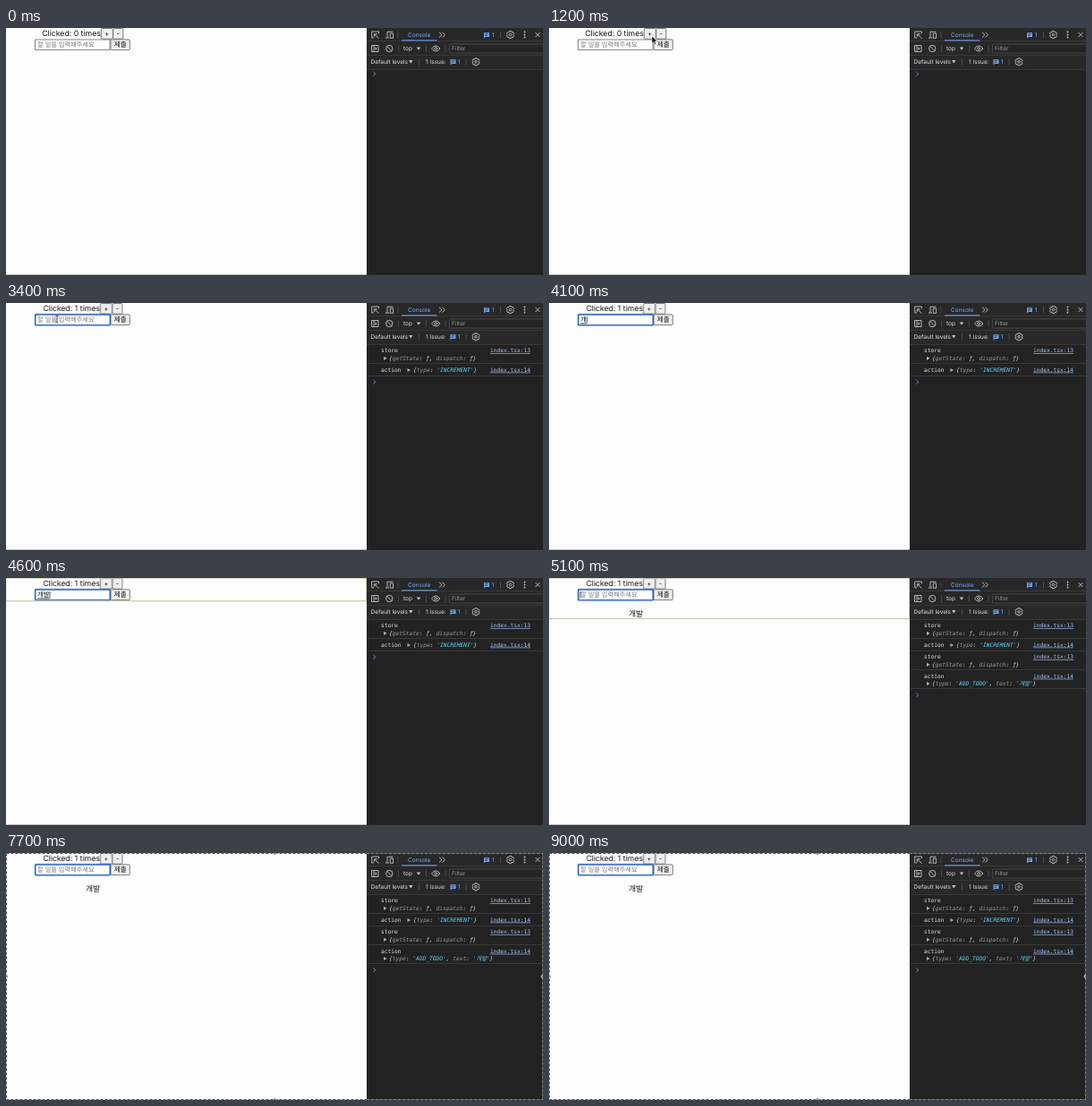
These frames come from a looping animation (600 by 276 pixels, 9.1 s). An HTML page:

```html
<!DOCTYPE html>
<html lang="ko">
<head>
<meta charset="utf-8">
<title>Counter and todo</title>
<style>
html, body { margin: 0; width: 100%; height: 100%; overflow: hidden; background: #fdfdfd; }
svg { display: block; width: 600px; height: 276px; text-rendering: geometricPrecision; }
text { white-space: pre; }
.page { font-family: Inter, "Noto Sans CJK KR", "Noto Sans CJK", sans-serif; fill: #111; }
.ko { font-family: "Noto Sans CJK KR", "Noto Sans CJK", sans-serif; }
.tools { font: 6.5px Inter, Roboto, sans-serif; fill: #dcdcdc; }
.log { font: 6.23px "DejaVu Sans Mono", "Noto Sans CJK KR", monospace; fill: #e3e3e3; }
.obj { font-style: italic; fill: #d0d0d0; }
.key { fill: #9a9a9a; }
.str { fill: #5cd5fb; }
.link { fill: #a8c7fa; text-decoration: underline; }
.line { fill: none; stroke: #c4c4c4; stroke-width: .9; }
.rule { stroke: #383838; stroke-width: 1; }
.prompt { fill: none; stroke: #5f94e4; stroke-width: 1; }
.button { fill: #efefef; stroke: #6e6e6e; stroke-width: .9; }
.flash { fill: none; stroke: #c3c6ae; stroke-width: 1.1; }

/* Shared 9.1 s clock: hard switches unless marked linear */
.t { animation: 9.1s step-end infinite; }
.zero { animation-name: zero; }
.one { animation-name: one; }
.mid { animation-name: mid; }
.todo { animation-name: todo; }
.hint { animation-name: hint; }
.focus { animation-name: focus; }
.caret { animation-name: caret; }
.k1 { animation-name: k1; }
.k2 { animation-name: k2; }
.k3 { animation-name: k3; }
.k4 { animation-name: k4; }
.k5 { animation-name: k5; }
.flash-a { animation-name: flashA; }
.flash-b { animation-name: flashB; }
.arrow { animation-name: arrow; }
.beam { animation-name: beam; }
.recenter { animation-name: recenter; }
.frame { animation-name: frame; animation-timing-function: linear; }
.pointer { animation: move 9.1s linear infinite; }

@keyframes zero { 0% { opacity: 1 } 15.3%, 100% { opacity: 0 } }
@keyframes one { 0% { opacity: 0 } 15.3%, 100% { opacity: 1 } }
@keyframes mid { 0% { opacity: 0 } 15.3% { opacity: 1 } 56%, 100% { opacity: 0 } }
@keyframes todo { 0% { opacity: 0 } 56%, 100% { opacity: 1 } }
@keyframes hint { 0% { opacity: 1 } 38.4% { opacity: 0 } 56%, 100% { opacity: 1 } }
@keyframes focus { 0% { opacity: 0 } 30.7%, 100% { opacity: 1 } }
@keyframes caret {
  0%, 36.2%, 61.5%, 72.5%, 83.5%, 94.5%, 100% { opacity: 0 }
  30.7%, 56%, 67%, 78%, 89% { opacity: 1 }
}
@keyframes k1 { 0%, 40.6%, 100% { opacity: 0 } 38.4% { opacity: 1 } }
@keyframes k2 { 0%, 46.1%, 100% { opacity: 0 } 40.6% { opacity: 1 } }
@keyframes k3 { 0%, 48.3%, 100% { opacity: 0 } 46.1% { opacity: 1 } }
@keyframes k4 { 0%, 50.5%, 100% { opacity: 0 } 48.3% { opacity: 1 } }
@keyframes k5 { 0%, 56%, 100% { opacity: 0 } 50.5% { opacity: 1 } }
@keyframes flashA {
  0%, 20.8%, 42.8%, 53.8%, 100% { opacity: 0 }
  15.3%, 38.4%, 46.1% { opacity: 1 }
}
@keyframes flashB { 0%, 62.6%, 100% { opacity: 0 } 56% { opacity: 1 } }
@keyframes arrow { 0%, 29.6%, 100% { opacity: 0 } 1% { opacity: 1 } }
@keyframes beam { 0%, 38.4%, 100% { opacity: 0 } 29.6% { opacity: 1 } }
@keyframes recenter { 0% { transform: none } 15.3%, 100% { transform: translateX(-.8px) } }
@keyframes frame { 0%, 77.5% { opacity: 0 } 80.2%, 100% { opacity: 1 } }
@keyframes move {
  0%, 1% { transform: translate(18px, 162px); animation-timing-function: ease-in-out }
  11%, 16.5% { transform: translate(115px, 9px); animation-timing-function: ease-in-out }
  24%, 26.5% { transform: translate(61px, 25px); animation-timing-function: ease-in-out }
  30.7%, 100% { transform: translate(57px, 18px) }
}
</style>
</head>
<body>
<svg viewBox="0 0 600 276">
  <defs>
    <g id="gear" class="line">
      <path d="M-1-4.1H1L1.5-2.8L3-3L4-1.2L3.1 0L4 1.2L3 3L1.5 2.8L1 4.1H-1L-1.5 2.8L-3 3L-4 1.2L-3.1 0L-4-1.2L-3-3L-1.5-2.8Z"/>
      <circle r="1.3"/>
    </g>
    <g id="bubble">
      <path d="M-3-2.8H3V2H-1.4L-3 3.4Z" fill="#6ba4f8"/>
      <path d="M-1.8-1.3H1.8M-1.8.4H.8" stroke="#282828" stroke-width=".7"/>
    </g>
    <path id="bar" d="M0-3.5V3.5" stroke="#555" stroke-width=".8"/>
    <path id="down" d="M-2.2-1.6H2.2L0 1.8Z" fill="#c4c4c4"/>
    <path id="open" d="M0-2.1L3.6 0L0 2.1Z" fill="#b0b0b0"/>
    <path id="prompt" class="prompt" d="M410.3-2.3L412.8 0L410.3 2.3"/>
    <g id="store" class="log">
      <text x="419" y="55.3">store</text>
      <text class="link" x="541" y="55.3">index.tsx:13</text>
      <use href="#open" x="422" y="61.8"/>
      <text class="obj" x="428" y="63.9">{<tspan class="key">getState</tspan>: ƒ, <tspan class="key">dispatch</tspan>: ƒ}</text>
      <path class="rule" d="M404 67.5H600"/>
    </g>
  </defs>

  <!-- Page -->
  <rect width="403" height="276" fill="#fdfdfd"/>
  <path d="M0 275.5H403" stroke="#c9c9c9"/>
  <g class="page">
    <g class="t recenter">
      <g font-size="8.7" text-anchor="end">
        <text class="t zero" x="105.8" y="9">Clicked: 0 times</text>
        <text class="t one" x="105.8" y="9">Clicked: 1 times</text>
      </g>
      <rect class="button" x="106.3" y=".5" width="13" height="11.7" rx="1"/>
      <rect class="button" x="119.8" y=".5" width="11" height="11.7" rx="1"/>
      <g font-size="7.4" text-anchor="middle">
        <text x="112.8" y="8.6">+</text>
        <text x="125.3" y="8.6">-</text>
      </g>
    </g>
    <g transform="translate(0 -.3)">
      <rect x="32.5" y="13.3" width="83.5" height="11.4" fill="#fff" stroke="#777" stroke-width=".9"/>
      <rect class="button" x="117" y="13.2" width="21.3" height="11.7" rx="1"/>
      <text class="ko" x="127.7" y="21.8" font-size="7.6" font-weight="500" text-anchor="middle">제출</text>
      <rect class="t focus" x="32.7" y="13.2" width="83.6" height="11.7" rx="1" fill="#fff" stroke="#1f5fc0" stroke-width="1.5"/>
      <text class="t hint ko" x="35" y="21.3" font-size="7.2" fill="#757575">할 일을 입력해주세요</text>
      <path class="t caret" d="M35 15.3V22.8" stroke="#111" stroke-width=".8"/>
      <g class="ko" font-size="7.4" stroke-width=".7">
        <g class="t k1"><text x="35" y="21.5">ㄱ</text><path d="M35 23.1h6.8M42.3 15.5v7.5" stroke="#111"/></g>
        <g class="t k2"><text x="35" y="21.5">개</text><path d="M35 23.1h6.8M42.3 15.5v7.5" stroke="#111"/></g>
        <g class="t k3"><text x="35" y="21.5">갭</text><path d="M35 23.1h6.8M42.3 15.5v7.5" stroke="#111"/></g>
        <g class="t k4"><text x="35" y="21.5">개바</text><path d="M35 23.1h13.6M49 15.5v7.5" stroke="#111"/></g>
        <g class="t k5"><text x="35" y="21.5">개발</text><path d="M35 23.1h13.6M49 15.5v7.5" stroke="#111"/></g>
      </g>
    </g>
    <text class="t todo ko" x="97" y="43.2" font-size="8.8" text-anchor="middle">개발</text>
  </g>
  <rect class="t flash flash-a" x="-.2" y=".2" width="403" height="25.5"/>
  <rect class="t flash flash-b" x="-.2" y=".2" width="403" height="45.3"/>

  <!-- Developer tools -->
  <rect x="403" width="197" height="276" fill="#222"/>
  <rect x="403" width="197" height="46" fill="#282828"/>
  <path class="rule" d="M403 14.5H600M403 30.5H600M403 46.5H600"/>
  <g class="tools">
    <path class="line" d="M411 11H408.7V4H416.5V6.2M411.6 6.8L416.6 11.8M411.6 10V6.8H414.9"/>
    <path class="line" d="M426 10.5V4.2H432.5M424 11H428M429.3 6H432.6V11.3H429.3Z"/>
    <use href="#bar" x="438" y="7.5"/>
    <text x="449" y="10" fill="#7cacf8">Console</text>
    <path d="M442 13.9H481.5" stroke="#7cacf8" stroke-width="1"/>
    <path class="line" d="M484 4.7L487 7.6L484 10.5M487.5 4.7L490.5 7.6L487.5 10.5"/>
    <use href="#bubble" x="537" y="8"/>
    <text x="542.7" y="10.4" fill="#7cacf8">1</text>
    <use href="#bar" x="552.5" y="7.5"/>
    <use href="#gear" x="563.5" y="7.5"/>
    <g fill="#c4c4c4"><circle cx="579.5" cy="4.5" r=".9"/><circle cx="579.5" cy="7.5" r=".9"/><circle cx="579.5" cy="10.5" r=".9"/></g>
    <path class="line" d="M591.5 5L596.5 10M596.5 5L591.5 10"/>

    <path class="line" d="M408.5 19.5H416V26.5H408.5ZM411 19.5V26.5"/>
    <path d="M412.5 21.2L414.7 23L412.5 24.8Z" fill="#c4c4c4"/>
    <circle class="line" cx="428.3" cy="23" r="3.7"/>
    <path class="line" d="M425.7 20.4L430.9 25.6"/>
    <use href="#bar" x="438.5" y="23"/>
    <text x="444" y="25.3">top</text>
    <use href="#down" x="461" y="23"/>
    <use href="#bar" x="469.5" y="23"/>
    <path class="line" d="M475.5 23Q480.2 16.8 485 23Q480.2 29.2 475.5 23Z"/>
    <circle class="line" cx="480.2" cy="23" r="1.4"/>
    <use href="#bar" x="491" y="23"/>
    <rect x="495.5" y="18" width="106" height="10" rx="1" fill="#242424" stroke="#505050" stroke-width=".8"/>
    <text x="498" y="25.4" fill="#999">Filter</text>

    <text x="407.5" y="40">Default levels</text>
    <use href="#down" x="452.3" y="37.7"/>
    <use href="#bar" x="461.5" y="38"/>
    <text x="469" y="40">1 Issue:</text>
    <use href="#bubble" x="499.5" y="38"/>
    <text x="504.8" y="40.2" fill="#7cacf8">1</text>
    <use href="#bar" x="514" y="38"/>
    <use href="#gear" x="525" y="37.8"/>
  </g>

  <use class="t zero" href="#prompt" y="51.3"/>
  <g class="t one">
    <use href="#store"/>
    <g class="log">
      <text x="419" y="77">action</text>
      <text class="link" x="541" y="76.6">index.tsx:14</text>
      <use href="#open" x="448.5" y="75"/>
      <text class="obj" x="455" y="77">{<tspan class="key">type</tspan>: <tspan class="str">'INCREMENT'</tspan>}</text>
    </g>
    <path class="rule" d="M404 81.5H600"/>
  </g>
  <use class="t mid" href="#prompt" y="88.3"/>
  <g class="t todo">
    <use href="#store" y="35"/>
    <g class="log">
      <text x="419" y="111.7">action</text>
      <text class="link" x="541" y="111.7">index.tsx:14</text>
      <use href="#open" x="422" y="118"/>
      <text class="obj" x="428" y="120.1">{<tspan class="key">type</tspan>: <tspan class="str">'ADD_TODO'</tspan>, <tspan class="key">text</tspan>: <tspan class="str">'개발'</tspan>}</text>
    </g>
    <path class="rule" d="M404 123.5H600"/>
    <use href="#prompt" y="130.7"/>
  </g>

  <!-- Pointer and capture frame -->
  <g class="pointer">
    <path class="t arrow" d="M0 0V8.2L1.9 6.5L3.2 9.5L4.6 8.9L3.3 6H5.9Z" fill="#000" stroke="#fff" stroke-width=".6"/>
    <path class="t beam" d="M-1.5-4Q0-4 0-3Q0-4 1.5-4M0-3V3M-1.5 4Q0 4 0 3Q0 4 1.5 4" fill="none" stroke="#222" stroke-width=".8"/>
  </g>
  <g class="t frame">
    <rect x=".5" y=".5" width="599" height="275" fill="none" stroke="#ddd" stroke-opacity=".6"/>
    <rect x=".5" y=".5" width="599" height="275" fill="none" stroke="#555" stroke-dasharray="3 2"/>
    <g fill="#888" stroke="#eee" stroke-width=".5">
      <circle cx="300" cy=".5" r="1.7"/><circle cx="300" cy="275.5" r="1.7"/>
      <circle cx=".5" cy="138" r="1.7"/><circle cx="599.5" cy="138" r="1.7"/>
    </g>
  </g>
</svg>
</body>
</html>
```
